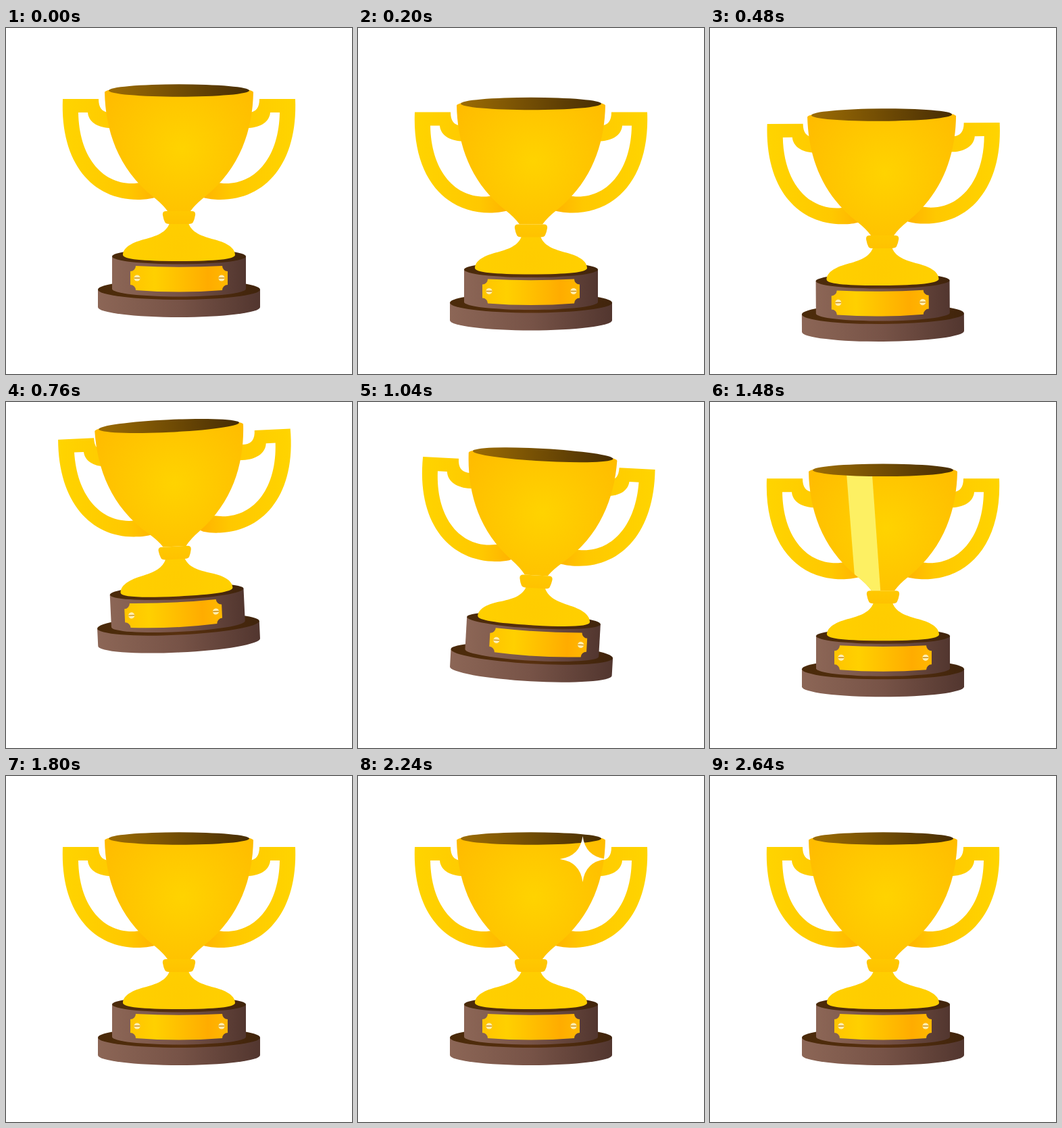
Recreate the animation shown at these times as an HTML page. Size 512 px wide and 512 px high, loop 2.8 s.

```html
<!DOCTYPE html>
<html lang="en">
<head>
<meta charset="utf-8">
<title>Trophy</title>
<style>
  html, body { margin: 0; width: 100%; height: 100%; overflow: hidden; background: #fff; }
  svg { display: block; width: 100vw; height: 100vh; }
</style>
</head>
<body>
<svg viewBox="0 0 512 512">
  <defs>
    <radialGradient id="gold" gradientUnits="userSpaceOnUse" cx="260" cy="178" r="135">
      <stop offset="0" stop-color="#ffd300"/><stop offset="1" stop-color="#ffbc00"/>
    </radialGradient>
    <radialGradient id="foot-gold" gradientUnits="userSpaceOnUse" cx="256" cy="325" r="90">
      <stop offset="0" stop-color="#ffcc00"/><stop offset="1" stop-color="#ffd000"/>
    </radialGradient>
    <linearGradient id="arm" gradientUnits="userSpaceOnUse" x1="84" y1="0" x2="220" y2="0">
      <stop offset="0" stop-color="#ffd400"/><stop offset=".7" stop-color="#ffc800"/><stop offset="1" stop-color="#ffb400"/>
    </linearGradient>
    <linearGradient id="collar" x2="0" y2="1">
      <stop offset="0" stop-color="#ffc800"/><stop offset="1" stop-color="#ffc200"/>
    </linearGradient>
    <linearGradient id="hollow">
      <stop offset="0" stop-color="#9c6c04"/><stop offset="1" stop-color="#472d04"/>
    </linearGradient>
    <linearGradient id="wood">
      <stop offset="0" stop-color="#8c6656"/><stop offset=".5" stop-color="#775347"/><stop offset="1" stop-color="#52362f"/>
    </linearGradient>
    <linearGradient id="wood-top">
      <stop offset="0" stop-color="#4a2a0a"/><stop offset=".5" stop-color="#58300f"/><stop offset="1" stop-color="#40240c"/>
    </linearGradient>
    <linearGradient id="brass">
      <stop offset="0" stop-color="#ffc400"/><stop offset=".25" stop-color="#ffd000"/>
      <stop offset=".8" stop-color="#ffac00"/><stop offset="1" stop-color="#ffb800"/>
    </linearGradient>
    <path id="bowl" d="M146 95C147 150 165 208 218 250Q232 261 239 271H273Q280 261 294 250C347 208 365 150 366 95Q364 87 256 87Q148 87 146 95Z"/>
    <clipPath id="bowl-clip"><use href="#bowl"/></clipPath>
    <path id="handle" fill="url(#arm)" d="M84 105H137C137 118 142 124 152 125H168V148H153C134 147 122 138 121 125H107C108 190 142 232 190 230L206 228L232 228L230 246L220 251C212 253 205 254 195 254C128 254 80 200 84 105Z"/>
    <g id="screw">
      <circle r="4.6" fill="#ffeeb0"/>
      <path d="M-4.4 0H4.4" stroke="#c98a10" stroke-width="1.4"/>
    </g>
  </defs>

  <g id="trophy">
    <g id="handles">
      <use href="#handle"/>
      <use href="#handle" transform="matrix(-1 0 0 1 512 0)"/>
    </g>
    <path fill="url(#wood)" d="M136 387V413A120 15 0 0 0 376 413V387Z"/>
    <ellipse cx="256" cy="387" rx="120" ry="15" fill="url(#wood-top)"/>
    <path fill="url(#wood)" d="M157 338V386A99 11.5 0 0 0 355 386V338Z"/>
    <ellipse cx="256" cy="338" rx="99" ry="11.5" fill="url(#wood-top)"/>
    <g id="plate">
      <path fill="url(#brass)" d="M192 352Q256 355.500 320 352A8 8 0 0 0 328 360V380A8 8 0 0 0 320 388Q256 393 192 388A8 8 0 0 0 184 380V360A8 8 0 0 0 192 352Z"/>
      <use href="#screw" x="194" y="370"/>
      <use href="#screw" x="319" y="370"/>
    </g>
    <path fill="url(#foot-gold)" d="M242 289C236 305 218 309 200 314C180 320 173 328 173 336Q174 345 256 345Q338 345 339 336C339 328 332 320 312 314C294 309 276 305 270 289Z"/>
    <use href="#bowl" fill="url(#gold)"/>
    <g clip-path="url(#bowl-clip)">
      <path id="sheen" fill="#fdf063" d="M-1 85H37L50.500 275H14Z"/>
    </g>
    <ellipse cx="256" cy="92.500" rx="104" ry="9.300" fill="url(#hollow)"/>
    <path fill="url(#collar)" d="M237 271H275Q281 271 280 277Q279 283 277 287Q276 290 270 290H242Q236 290 235 287Q233 283 232 277Q231 271 237 271Z"/>
  </g>
  <path id="spark" fill="#fff" d="M0-34Q4-4 34 0Q4 4 0 34Q-4 4-34 0Q-4-4 0-34Z"/>
</svg>
<script>
const LOOP = 2800, STEP = 40;
const $ = id => document.getElementById(id);

// Monotone cubic curve through [time, value] points
function curve(...pts) {
  const last = pts.length - 1;
  const rise = i => (pts[i + 1][1] - pts[i][1]) / (pts[i + 1][0] - pts[i][0]);
  const slope = pts.map((_, i) => {
    if (i === 0 || i === last) return 0;
    const a = rise(i - 1), b = rise(i);
    return a * b > 0 ? 2 * a * b / (a + b) : 0;
  });
  return t => {
    if (t <= pts[0][0]) return pts[0][1];
    if (t >= pts[last][0]) return pts[last][1];
    const i = pts.findIndex(p => p[0] > t) - 1;
    const [t0, v0] = pts[i], [t1, v1] = pts[i + 1];
    const d = t1 - t0, u = (t - t0) / d, w = 1 - u;
    return v0 * (1 + 2 * u) * w * w + v1 * u * u * (3 - 2 * u)
      + d * u * w * (slope[i] * w - slope[i + 1] * u);
  };
}

const lift = curve([0, 0], [420, 42], [480, 36], [560, 20], [765, -57.5],
  [1040, -14.7], [1120, 4], [1260, 26], [1480, 8.3], [1680, 1.5], [1760, 0]);
const tilt = curve([400, 0], [480, -0.35], [560, -2], [660, -4.3], [760, -2.7],
  [970, 4], [1040, 3.2], [1120, 2], [1290, 0]);
const plateShift = curve([340, 0], [480, -4], [660, -8], [760, -6.5],
  [1000, 9], [1040, 8.5], [1120, 5.5], [1290, 0]);
const handleShift = curve([340, 0], [480, 2.5], [740, 7.5],
  [1000, -5.5], [1040, -5.2], [1120, -3], [1290, 0]);

function place(id, transform) {
  $(id).setAttribute("transform", transform);
}

function draw(now) {
  const t = Math.floor(now % LOOP / STEP) * STEP;
  place("trophy", `translate(0 ${lift(t)}) rotate(${tilt(t)} 256 410)`);
  place("plate", `translate(${plateShift(t)} 0)`);
  place("handles", `translate(${handleShift(t)} 0)`);

  const sweep = t >= 1280 && t < 1800;
  place("sheen", `translate(${sweep ? 202 + 0.533 * (t - 1480) : -200} 0)`);

  const u = (t - 1880) / 760;
  const size = u > 0 && u < 1 ? Math.sin(Math.PI * u) : 0;
  place("spark", `translate(332.5 123) scale(${size})`);
}

const start = performance.now();
function tick() {
  draw(performance.now() - start);
  requestAnimationFrame(tick);
}
tick();
</script>
</body>
</html>
```
